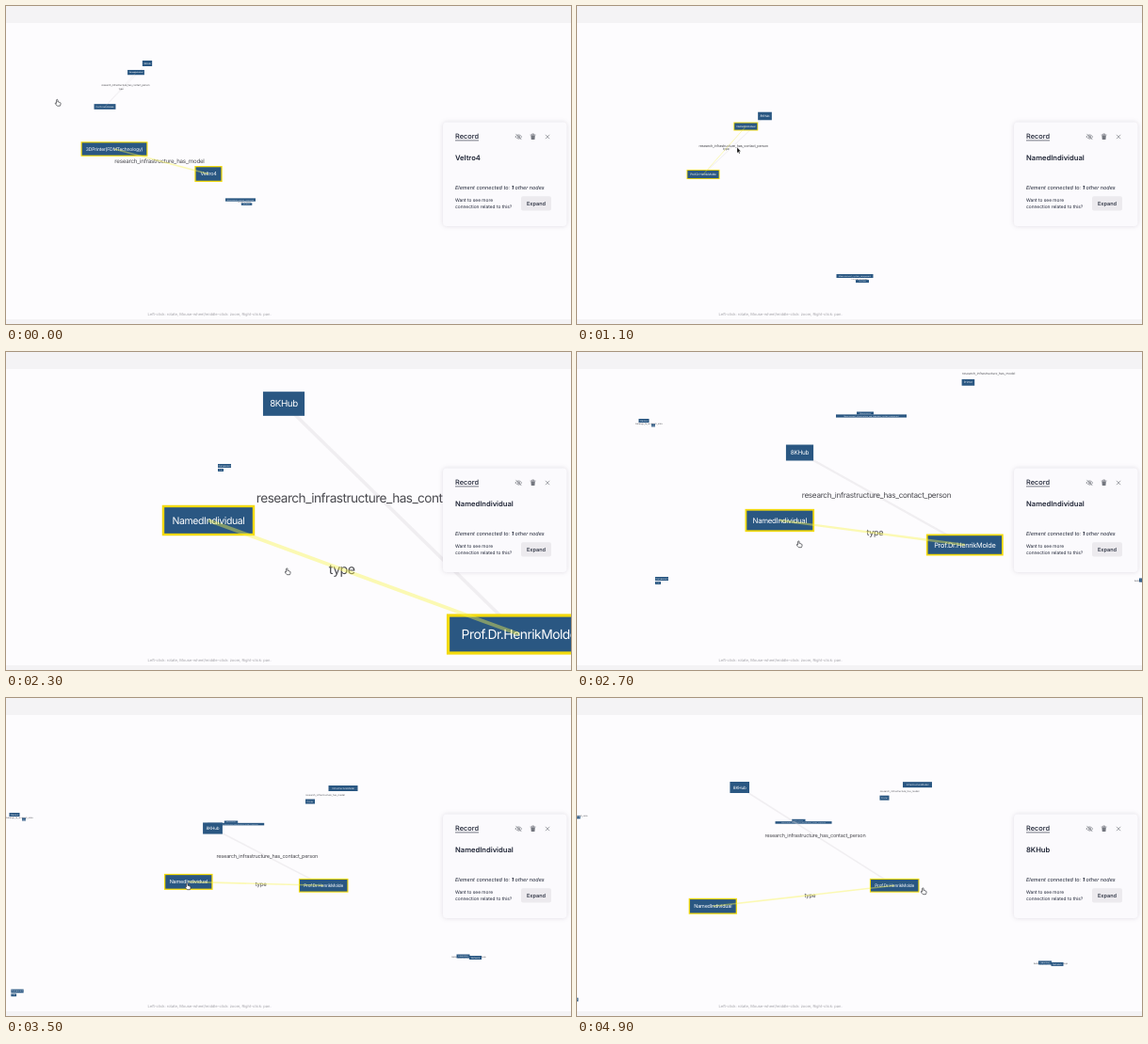
These frames come from a looping animation (600 px wide and 338 px high, 5 s). An HTML page:

```html
<!DOCTYPE html>
<html lang="en">
<head>
<meta charset="utf-8">
<title>Graph explorer</title>
<style>
html, body { margin: 0; width: 100%; height: 100%; overflow: hidden; background: #fdfcfe; }
svg { display: block; width: 100vw; height: 100vh; }
text { font-family: Inter, "Open Sans", sans-serif; text-rendering: geometricPrecision; }
.mid { text-anchor: middle; }
.graph { font-size: 10.8px; letter-spacing: -.42px; }
.panel { filter: drop-shadow(0 0 2.5px rgba(60, 50, 80, .16)); }
.icon { fill: none; stroke: #74777f; stroke-width: .65; stroke-linecap: round; stroke-linejoin: round; }
</style>
</head>
<body>
<svg viewBox="0 0 600 338">
  <defs><clipPath id="view"><rect y="18" width="600" height="315"/></clipPath></defs>
  <rect width="600" height="338" fill="#fdfcfe"/>
  <rect width="600" height="18" fill="#f4f3f5"/>
  <rect y="333" width="600" height="5" fill="#f4f3f5"/>
  <g id="scene" clip-path="url(#view)"></g>
  <text x="150.5" y="329.3" font-size="4.05" fill="#a3a2a8">Left-click: rotate, Mouse-wheel/middle-click: zoom, Right-click: pan.</text>
  <g fill="#1c2233">
    <rect class="panel" x="464" y="123.5" width="131.5" height="110.5" rx="4" fill="#fbfafd"/>
    <text x="477" y="141.4" font-size="7.4" font-weight="500">Record</text>
    <path d="M477 142.9h25" stroke="#1c2233" stroke-width=".6"/>
    <text id="title" x="477" y="163.5" font-size="7.6" font-weight="600"></text>
    <text x="477" y="194.5" font-size="5.5" font-style="italic">Element connected to: <tspan font-weight="700">1</tspan> other nodes</text>
    <text x="477" y="207.8" font-size="4.83">Want to see more</text>
    <text x="477" y="215.2" font-size="4.83">connection related to this?</text>
    <rect x="547" y="202.3" width="32" height="15.2" rx="2" fill="#eceaee"/>
    <text class="mid" x="563" y="212" font-size="5.6" font-weight="500">Expand</text>
    <path class="icon" d="M541 139q3.4-4.4 6.8 0q-3.4 4.4-6.8 0M541.7 136.2l5.4 5.6"/>
    <circle class="icon" cx="544.4" cy="139" r="1"/>
    <path class="icon" d="M557 137h5.2M558.7 136.8v-.9h1.8v.9"/>
    <path d="M557.4 137.6h4.4l-.4 4.4h-3.6z" fill="#74777f"/>
    <path class="icon" d="M573.2 137.1l3.8 3.8m0-3.8l-3.8 3.8"/>
  </g>
  <g id="cursor" stroke-linejoin="round">
    <path id="hand" fill="#fff" stroke="#33343a" stroke-width=".8"
      d="M-1.6 1V-2.6q0-1 .8-1t.8 1V-.6q1.1-.5 1.4.3q1-.3 1.2.5q.9 0 .9.9q0 1.8-.8 3.1h-3.4q-1.3-1-2.3-3q0-1 .7-.8z"/>
    <path id="arrow" fill="#111" stroke="#fff" stroke-width=".3" d="M0-3v6.6l1.5-1.4 1 2.3 1-.5-1-2.2h2z"/>
  </g>
</svg>
<script>
const LOOP = 5000, STEP = 100, SELECT = 500, BLUE = '#2a5782';
const HAS = 'research_infrastructure_has_';
const $ = id => document.getElementById(id);
const scene = $('scene');

function add(parent, tag, attrs, text) {
  const el = document.createElementNS('http://www.w3.org/2000/svg', tag);
  set(el, attrs);
  if (text) el.textContent = text;
  return parent.appendChild(el);
}
function set(el, attrs) { for (const key in attrs) el.setAttribute(key, attrs[key]); }
const show = (el, on) => set(el, { visibility: on ? 'visible' : 'hidden' });
const place = (el, [x, y], s) => set(el, { transform: `translate(${x} ${y}) scale(${s})` });

const mix = (a, b, k) => a.map((v, i) => v + (b[i] - v) * k);
const ramp = (t, from, to) => Math.min(1, Math.max(0, (t - from) / (to - from)));
const easeOut = u => 1 - (1 - u) ** 1.5;

// Keys are { t, at }; the value eases from one key to the next.
function follow(keys, t, ease = easeOut) {
  let value = keys[0].at;
  for (let i = 1; i < keys.length; i++) {
    const k = ramp(t, keys[i - 1].t, keys[i].t);
    if (k > 0) value = mix(keys[i - 1].at, keys[i].at, ease(k));
  }
  return value;
}

// Camera views of the triangle: x, y and font size of each node.
const views = [
  { t: 600, named: [138, 70.6, 1.85], lab: [150, 61, 2.1], person: [105, 107, 2] },
  { t: 1100, named: [179.3, 128, 2.5], lab: [199.5, 117, 3], person: [134, 179, 2.9] },
  { t: 1900, named: [215.5, 179, 7.35], lab: [329, 126, 9.3], person: [246, 455, 12.5] },
  { t: 2300, named: [215, 179, 9.7], lab: [295, 55, 9], person: [545, 300, 12.9] },
  { t: 2700, named: [215.3, 179, 7.25], lab: [236.5, 107, 5.95], person: [411.8, 205, 6.85] },
  { t: 3500, named: [193.8, 195.4, 5.08], lab: [219.5, 138.5, 4.25], person: [337.2, 199.3, 4.4] },
];
const viewKeys = name => views.map(v => ({ t: v.t, at: v[name] }));
const drag = (from, to, start, end) => [{ t: from, at: start }, { t: to, at: end }];
// The first pair sweeps out of view as the camera leaves it.
const leave = ([x, y, s]) => drag(600, 900, [x, y, s], [x + 360, y + 260, s * 2]);

// em is the text width in font sizes.
const nodes = {
  printer: { text: '3DPrinter(FDMTechnology)', em: 13, keys: leave([115, 152, 4.65]) },
  model: { text: 'Veltro4', em: 3.56, keys: leave([215, 178.5, 5.05]) },
  lab: { text: '8KHub', em: 3.15, keys: [...viewKeys('lab'), ...drag(4200, 4500, [219.5, 138.5, 4.25], [172.7, 95, 4.2])] },
  person: { text: 'Prof.Dr.HenrikMolde', em: 9.7, keys: viewKeys('person') },
  named: { text: 'NamedIndividual', em: 7.9, keys: [...viewKeys('named'), ...drag(3500, 3900, [193.8, 195.4, 5.08], [144.3, 221.3, 5.05])] },
};
const isLit = (name, t) => name === 'printer' || name === 'model' || (name !== 'lab' && t >= SELECT);

const edges = [
  { a: 'lab', b: 'person', text: HAS + 'contact_person' },
  { a: 'printer', b: 'model', text: HAS + 'model' },
  { a: 'named', b: 'person', text: 'type' },
];

// Distant clusters; a part is [text, dx, dy, width, height], a bare label has only a font size.
const near = { parts: [['Measurement_system_component', 0, 0, 39, 4], ['has_part_of_system', 5, 3, 1.8], ['Oscillator', 8, 5.6, 14, 3]],
  keys: [{ t: 600, at: [249, 206, .82] }, { t: 1100, at: [295, 287, 1] }, { t: 1900, at: [298, 300, 1.22] }] };
const far = [
  { from: [71, 73, 1], to: [9, 124, 1], parts: [['belongs_to_research_area', 5.5, 3.2, 2.3], ['Device', 0, 0, 11, 4], ['Hub', 10, 5, 4, 3]] },
  { from: [90, 241, 1], to: [12, 311.5, .95], parts: [['Component', 0, 0, 14, 4], ['Part', -4, 4.5, 6, 3]] },
  { from: [306, 65, 1], to: [239, 131.7, .8], parts: [['Measurement', 0, 0, 18, 3], ['Measurement_infrastructure_and_laboratory_system_component', 6.5, 3, 75, 3.2]] },
  { from: [463, 13.3, 1.36], to: [358, 96, 1], parts: [['InfrastructureModel', 0, 0, 31, 6], [HAS + 'model', -19, 7, 2.5], ['Printer', -35, 14, 10, 5]] },
  { from: [610, 243, 1], to: [491.5, 275, 1], parts: [['belongs_to_the_research_group', 0, .5, 2.4], ['Laboratory', -6, -.5, 14, 4], ['Network', 7, 1, 13, 4]] },
];

// All far clusters share one sweep in, one zoom out and a last small zoom in.
function farPlace(c, t) {
  const [x, y, s] = mix(c.from, c.to, easeOut(ramp(t, 2700, 3500)));
  const sweep = 1 - easeOut(ramp(t, 2300, 2700));
  const zoom = .06 * ramp(t, 3500, 4200);
  return [x + 142 * sweep + (x - 300) * zoom, y - 120 * sweep + (y - 160) * zoom, s];
}

for (const c of [near, ...far]) {
  c.el = add(scene, 'g');
  for (const [text, dx, dy, w, h] of c.parts) {
    if (h) add(c.el, 'rect', { x: dx - w / 2, y: dy - h / 2, width: w, height: h, fill: BLUE });
    const size = h ? Math.min(h * .6, w / text.length * 1.55) : w;
    add(c.el, 'text', { class: 'mid', x: dx, y: dy + size * .36, 'font-size': size, fill: h ? '#e8eef5' : '#55565c' }, text);
  }
}
const under = add(scene, 'g'), labels = add(scene, 'g'), boxes = add(scene, 'g'), over = add(scene, 'g');
for (const e of edges) {
  e.line = add(e.a === 'lab' ? under : over, 'line');
  e.label = add(labels, 'text', { class: 'mid graph', fill: '#4b4b50', y: 3.6 }, e.text);
}
for (const n of Object.values(nodes)) {
  const width = (n.em + 1.75) * 10, height = 28.5;
  const box = { x: -width / 2, y: -height / 2, width, height };
  n.el = add(boxes, 'g');
  n.ring = add(n.el, 'rect', { ...box, fill: 'none', stroke: '#f3da0c' });
  add(n.el, 'rect', { ...box, fill: BLUE });
  add(n.el, 'text', { class: 'mid graph', fill: '#fff', y: 3.8 }, n.text);
}

// Midpoint of an edge in perspective: the nearer (larger) end counts less.
function middle(a, b) {
  const k = a[2] / (a[2] + b[2]);
  const [x, y] = mix(a, b, 1 - b[2] / (a[2] + b[2]));
  return [x, y, 2.38 * b[2] * k];
}

const pointer = [
  { t: 0, at: [55, 102.5] }, { t: 400, at: [138, 72] }, { t: 600, at: [138, 72] }, { t: 1100, at: [170, 153] },
  { t: 1900, at: [263.5, 256.5] }, { t: 2300, at: [299, 233] }, { t: 2700, at: [236, 204] }, { t: 3500, at: [193, 200] },
  { t: 3900, at: [143.5, 225.5] }, { t: 4200, at: [222, 140] }, { t: 4500, at: [175, 98] }, { t: 4900, at: [368, 205] },
];

function draw(t) {
  const [x, y, s] = follow(near.keys, t);
  place(near.el, [x, y], s);
  show(near.el, t <= 2100);
  for (const c of far) {
    const pos = farPlace(c, t);
    place(c.el, pos, pos[2]);
    show(c.el, t >= 2300);
  }
  for (const name in nodes) {
    const n = nodes[name], size = (n.pos = follow(n.keys, t))[2];
    place(n.el, n.pos, size / 10);
    set(n.ring, { 'stroke-width': Math.max(.25 * size, .9) * 20 / size });
    show(n.ring, isLit(name, t));
  }
  for (const e of edges) {
    const a = nodes[e.a].pos, b = nodes[e.b].pos, mid = middle(a, b);
    const lit = isLit(e.a, t) && isLit(e.b, t);
    place(e.label, mid, mid[2] / 10);
    set(e.line, {
      x1: a[0], y1: a[1], x2: b[0], y2: b[1],
      stroke: lit ? '#f7f24a' : '#d8d5d8', 'stroke-opacity': lit ? .42 : .36,
      'stroke-width': mid[2] * .29,
    });
  }
  const chosen = t < SELECT ? 'model' : t < 4200 ? 'named' : 'lab';
  $('title').textContent = nodes[chosen].text;
  place($('cursor'), follow(pointer, t, u => u), .88);
  const arrow = t >= 700 && t < 1500;
  show($('arrow'), arrow);
  show($('hand'), !arrow);
}

function tick() {
  draw(Math.floor(performance.now() % LOOP / STEP) * STEP);
  requestAnimationFrame(tick);
}
tick();
</script>
</body>
</html>
```
